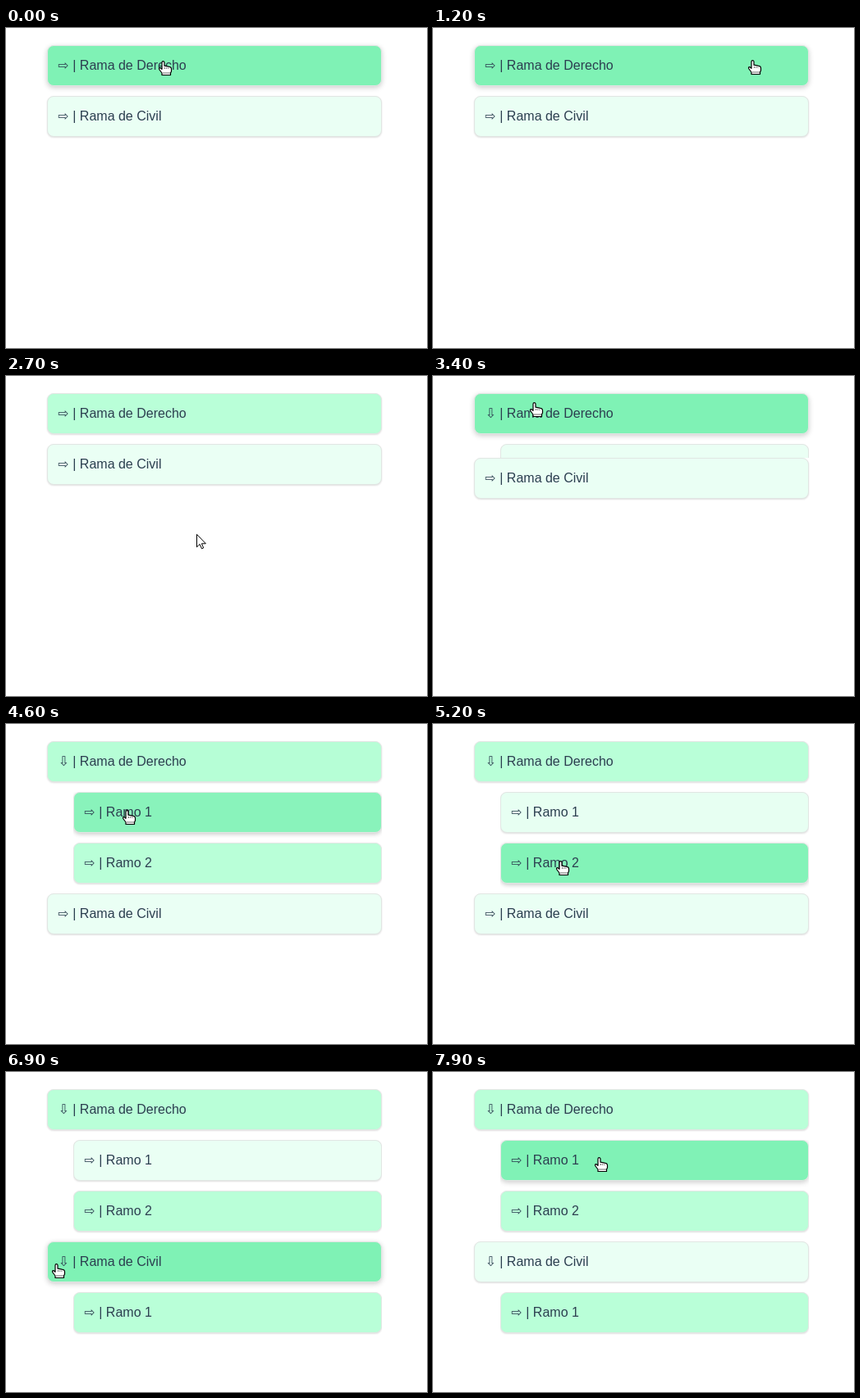
These frames come from a looping animation (513x391 px, 8 s). An HTML page:

```html
<!DOCTYPE html>
<html lang="es">
<head>
<meta charset="utf-8">
<title>Ramas</title>
<style>
  html, body { margin: 0; width: 100%; height: 100%; overflow: hidden; background: #fff; }
  #tree { position: absolute; left: 50.4px; top: 21px; width: 407.6px; }
  .row {
    box-sizing: border-box; height: 50px; margin-bottom: 12px; padding: 12px;
    border: 1px solid #e1e6e3; border-radius: 8px;
    font: 16px/24px "Liberation Sans", "DejaVu Sans", sans-serif;
    color: #2c3e50; white-space: pre;
  }
  .kids { margin-left: 32px; height: 0; overflow: hidden; }
  #cursor { position: absolute; left: 0; top: 0; overflow: visible; }
</style>
</head>
<body>
<div id="tree"></div>
<svg id="cursor" width="16" height="19" fill="#fff" stroke="#000" stroke-linejoin="round">
  <g id="hand">
    <path d="M4 2.2a1.500 1.500 0 0 1 3 0V6.200l5 .9q3.500.4 3.500 2.900v3l-1 2v2.500H4V15L1 11Q0 9 1.300 8.600 2.500 8.300 4 10.300z" stroke-width="1.2"/>
    <path d="M7.500 8v2M9.700 8.300v1.700M11.900 8.600v1.400M5 15h9" fill="none" stroke-width=".6"/>
  </g>
  <path id="arrow" d="M.5.5V16l3.600-3.500 2.400 5.500 2.200-1-2.300-5.200h5z"/>
</svg>
<script>
const LOOP = 8000, TICK = 100, FADE = 300;
const HEIGHT = 50, PITCH = 62, TOP = 21, LEFT = 50, RIGHT = 458, INDENT = 32;
const MID = [185, 255, 216], LIGHT = [234, 255, 244], HOVER = [127, 242, 181];

const tree = [
  { text: "Rama de Derecho", base: MID, open: 3322, kids: [
    { text: "Ramo 1", base: LIGHT }, { text: "Ramo 2", base: MID }] },
  { text: "Rama de Civil", base: LIGHT, open: 6560, kids: [{ text: "Ramo 1", base: MID }] }
];

// Pointer moves: start, end, left, top
const rest = [186, 40];
const moves = [
  [100, 400, 416, 32], [900, 1200, 384, 39], [1300, 1400, 335, 40], [1640, 1900, 323, 116],
  [2200, 2300, 312, 125], [2400, 2700, 232, 193], [2700, 3250, 118, 32], [4300, 4550, 142, 105],
  [4900, 5150, 150, 167], [5600, 5900, 46, 163], [6200, 6450, 56, 234], [6900, 7100, 48, 315],
  [7200, 7300, 49, 333], [7400, 7500, 18, 318], [7500, 7600, 20, 110], [7600, 7850, 197, 104]
];

const $ = id => document.getElementById(id);
const mix = (a, b, k) => a + (b - a) * k;
const clamp = v => Math.min(1, Math.max(0, v));
const easeOut = p => 1 - (1 - p) ** 2;

function bezier(x1, y1, x2, y2) {
  const at = (a, b, s) => 3 * a * s * (1 - s) ** 2 + 3 * b * s * s * (1 - s) + s ** 3;
  return p => {
    if (p <= 0 || p >= 1) return clamp(p);
    let lo = 0, hi = 1;
    for (let i = 0; i < 24; i++) {
      const s = (lo + hi) / 2;
      if (at(x1, x2, s) < p) lo = s; else hi = s;
    }
    return at(y1, y2, lo);
  };
}
const ease = bezier(.25, .1, .25, 1);
const easeInOut = bezier(.42, 0, .58, 1);

function build(list, parent) {
  for (const row of list) {
    row.el = parent.appendChild(document.createElement("div"));
    row.el.className = "row";
    row.toggles = [];
    if (!row.kids) continue;
    row.box = parent.appendChild(document.createElement("div"));
    row.box.className = "kids";
    build(row.kids, row.box);
  }
}

function pointerAt(t) {
  let [x, y] = rest;
  for (const [start, end, toX, toY] of moves) {
    const k = easeOut(clamp((t - start) / (end - start)));
    x = mix(x, toX, k);
    y = mix(y, toY, k);
  }
  return [Math.round(x), Math.round(y)];
}

const kidsHeight = (row, t) => row.kids.length * PITCH * easeInOut((t - row.open) / FADE);

function rowAt(x, y, t) {
  const hit = (left, top) => x >= left && x < RIGHT && y >= top && y < top + HEIGHT;
  let top = TOP;
  for (const row of tree) {
    if (hit(LEFT, top)) return row;
    top += PITCH;
    const height = kidsHeight(row, t);
    const kid = row.kids.find((_, i) => y < top + height && hit(LEFT + INDENT, top + i * PITCH));
    if (kid) return kid;
    top += height;
  }
}

// Records when the fingertip enters and leaves each row.
function trace() {
  let current = tree[0];
  current.toggles.push(-FADE);
  for (let t = 0; t < LOOP; t += 5) {
    const [x, y] = pointerAt(t);
    const next = rowAt(x + 6, y + 1, t);
    if (next === current) continue;
    if (current) current.toggles.push(t);
    if (next) next.toggles.push(t);
    current = next;
  }
}

// The screen refreshes on ticks where the pointer has moved or a list is opening.
function refreshTime(t) {
  for (let tick = Math.floor(t / TICK) * TICK; tick > 0; tick -= TICK) {
    const before = tick - TICK;
    const moved = String(pointerAt(tick)) !== String(pointerAt(before));
    if (moved || tree.some(row => tick > row.open && before < row.open + FADE)) return tick;
  }
  return 0;
}

function hoverLevel(toggles, t) {
  let v = 0;
  toggles.forEach((start, i) => {
    if (t < start) return;
    const end = Math.min(t, toggles[i + 1] ?? t);
    v = mix(v, i % 2 ? 0 : 1, ease((end - start) / FADE));
  });
  return v;
}

function drawRow(row, t) {
  const { el, base } = row, k = hoverLevel(row.toggles, t);
  const label = (t >= row.open ? "⇩" : "⇨") + " | " + row.text;
  if (el.textContent !== label) el.textContent = label;
  el.style.background = `rgb(${base.map((c, i) => Math.round(mix(c, HOVER[i], k)))})`;
  el.style.boxShadow = `0 ${mix(1, 2, k)}px ${mix(2, 6, k)}px rgba(0,0,0,${mix(.13, .2, k)})`;
  if (!row.kids) return;
  row.box.style.height = kidsHeight(row, t) + "px";
  row.kids.forEach(kid => drawRow(kid, t));
}

function draw(now) {
  const t = refreshTime(now % LOOP);
  const [x, y] = pointerAt(t);
  const over = rowAt(x + 6, y + 1, t);
  tree.forEach(row => drawRow(row, t));
  $("cursor").style.transform = `translate(${x}px, ${y}px)`;
  $("hand").style.display = over ? "" : "none";
  $("arrow").style.display = over ? "none" : "";
}

build(tree, $("tree"));
trace();
const begin = performance.now();
function tick() {
  draw(performance.now() - begin);
  requestAnimationFrame(tick);
}
tick();
</script>
</body>
</html>
```
